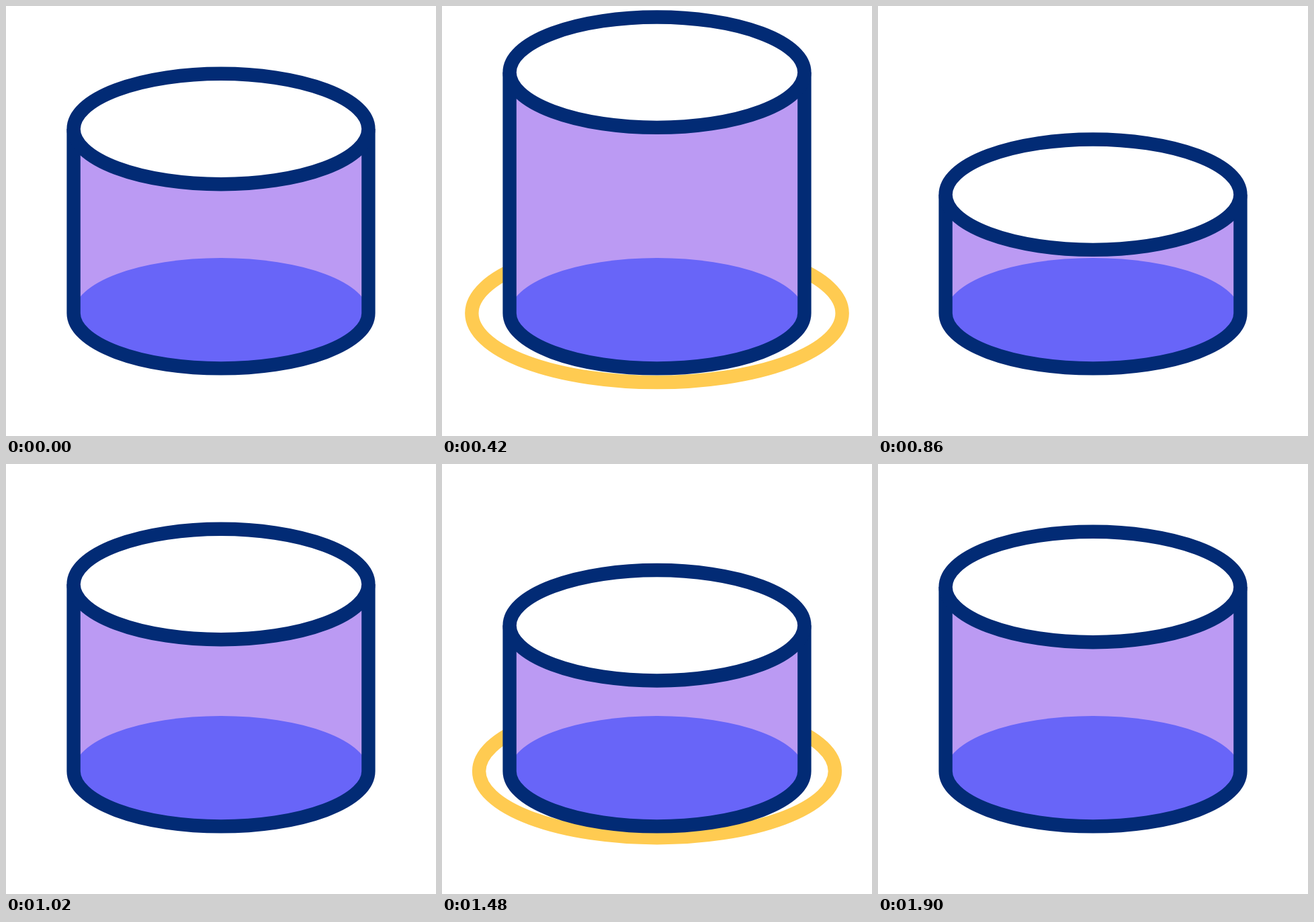
An HTML page with a canvas that plays this animation: 640 px wide and 640 px high, repeating every 2400 ms.

```html
<!DOCTYPE html>
<html lang="en">
<head>
<meta charset="utf-8">
<title>Cylinder</title>
<style>
html, body { margin: 0; width: 100%; height: 100%; overflow: hidden; background: #fff; }
canvas { display: block; }
</style>
</head>
<body>
<canvas id="stage" width="640" height="640"></canvas>
<script>
const ctx = document.getElementById('stage').getContext('2d');

const LOOP = 2400, STEP = 20;
const CX = 320, BASE = 457.2, TOP = 183, RX = 219.4, RY = 82.2;
const NAVY = '#022b75', LILAC = '#bb9af3', BLUE = '#6865f8', YELLOW = '#ffcb51';

// Height of the lid relative to rest: [time, offset], eased between points
const BOUNCE = [[0, 0], [395, -86], [838, 100.2], [1119, -45.5], [1440, 58.5], [1900, 0]];
const RINGS = [2, 1142];
const FADE_FROM = 500, FADE_TO = 600;

const smooth = u => u * u * (3 - 2 * u);

function lidOffset(t) {
  for (let i = 1; i < BOUNCE.length; i++) {
    const [t0, y0] = BOUNCE[i - 1], [t1, y1] = BOUNCE[i];
    if (t < t1) return y0 + (y1 - y0) * smooth((t - t0) / (t1 - t0));
  }
  return 0;
}

function oval(y, rx, ry) {
  ctx.beginPath();
  ctx.ellipse(CX, y, rx, ry, 0, 0, Math.PI * 2);
}

function ring(age) {
  if (age <= 0 || age >= FADE_TO) return;
  ctx.globalAlpha = Math.min(1, (FADE_TO - age) / (FADE_TO - FADE_FROM));
  ctx.strokeStyle = YELLOW;
  oval(BASE, RX + 0.1346 * age, RY + 0.0497 * age);
  ctx.stroke();
  ctx.globalAlpha = 1;
}

function cylinder(lid) {
  // Wall
  ctx.beginPath();
  ctx.moveTo(CX - RX, lid);
  ctx.lineTo(CX - RX, BASE);
  ctx.ellipse(CX, BASE, RX, RY, 0, Math.PI, 0, true);
  ctx.lineTo(CX + RX, lid);
  ctx.closePath();
  ctx.fillStyle = LILAC;
  ctx.fill();

  oval(BASE, RX, RY);
  ctx.fillStyle = BLUE;
  ctx.fill();

  // Outline of the sides and the front of the base
  ctx.strokeStyle = NAVY;
  ctx.beginPath();
  ctx.moveTo(CX - RX, lid);
  ctx.lineTo(CX - RX, BASE);
  ctx.ellipse(CX, BASE, RX, RY, 0, Math.PI, 0, true);
  ctx.lineTo(CX + RX, lid);
  ctx.stroke();

  oval(lid, RX, RY);
  ctx.fillStyle = '#fff';
  ctx.fill();
  ctx.stroke();
}

function draw(t) {
  ctx.fillStyle = '#fff';
  ctx.fillRect(0, 0, 640, 640);
  ctx.lineWidth = 20.4;
  RINGS.forEach(start => ring(t - start));
  cylinder(TOP + lidOffset(t));
}

const begin = performance.now();
function tick() {
  const t = Math.max(0, performance.now() - begin) % LOOP;
  draw(Math.floor(t / STEP) * STEP);
  requestAnimationFrame(tick);
}
tick();
</script>
</body>
</html>
```
